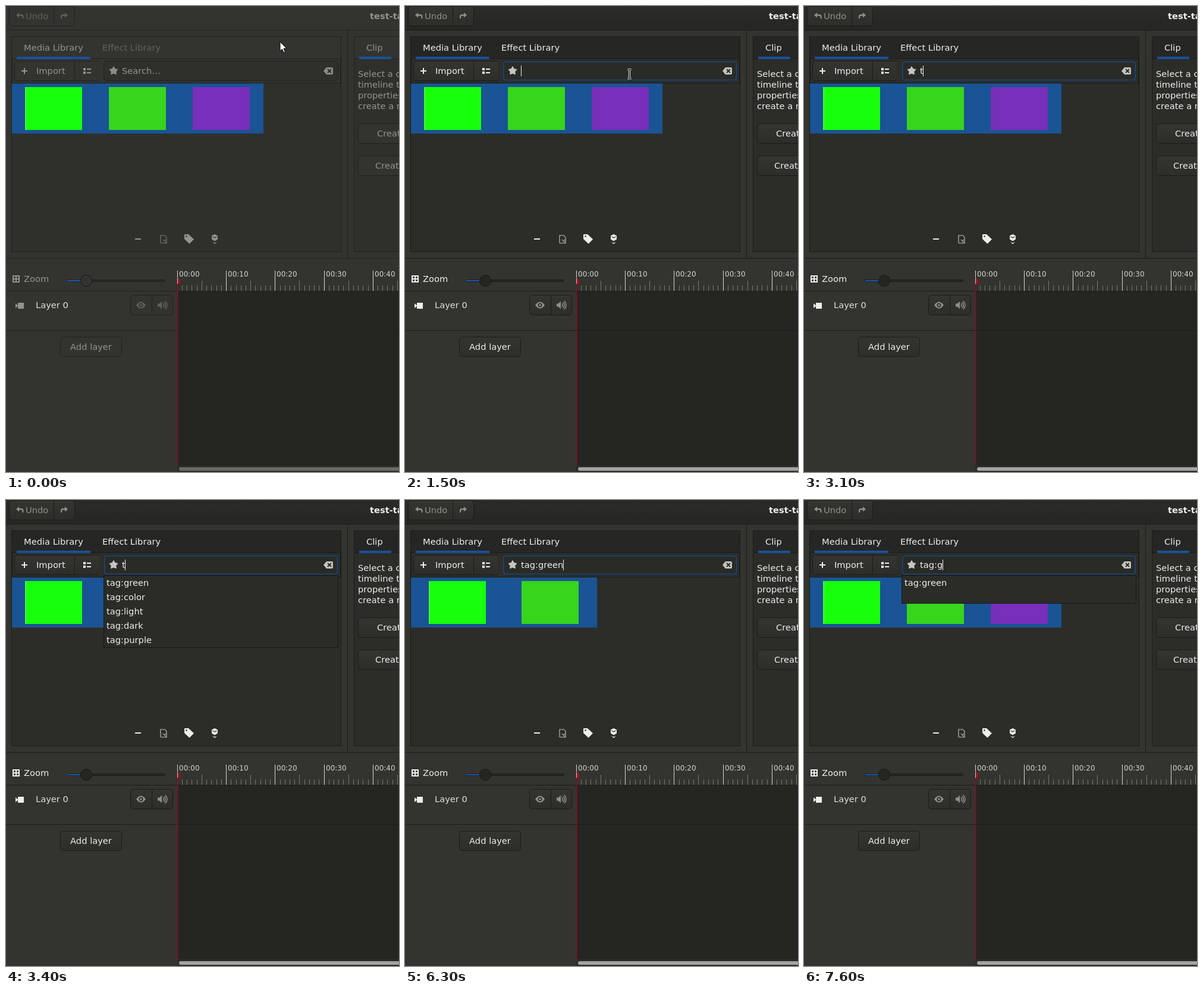
Write an HTML page that moves like this. It is 661 px wide and 782 px high and loops after 8 s.

```html
<!DOCTYPE html>
<html lang="en">
<head>
<meta charset="utf-8">
<title>Media library tag search</title>
<style>
  html, body { margin: 0; width: 100%; height: 100%; overflow: hidden; background: #333430; }
  svg {
    display: block; width: 100vw; height: 100vh;
    font-family: "DejaVu Sans", sans-serif; font-size: 14.667px; white-space: pre;
    --fg: #eeeeec; --dim: #8f908c; --tab: #eeeeec; --edge: #1b1c19;
    --bg: #333430; --panel: #2c2d29; --head: #262724; --headTop: #2b2c29;
    --btn: url(#btn); --flat: #2d2e2a; --bar: #a3a4a1; --knob: #252622; --star: #c4c4c1;
  }
  svg.off {
    --fg: #93948f; --dim: #60615d; --tab: #62635e; --edge: #21221f;
    --panel: #2f302c; --head: #333430; --headTop: #333430;
    --btn: #333430; --flat: #333430; --bar: #696a66; --knob: #333430; --star: #8b8c88;
  }
  text { fill: var(--fg); }
  .fg { fill: var(--fg); }
  .dim { fill: var(--dim); }
  .edge { fill: none; stroke: var(--edge); }
  .btn { fill: var(--btn); stroke: var(--edge); }
  .small { font-size: 12px; fill: #d0d0cd; }
</style>
</head>
<body>
<svg id="stage" viewBox="0 0 661 782" preserveAspectRatio="none">
  <defs>
    <linearGradient id="btn" x1="0" y1="0" x2="0" y2="1">
      <stop offset="0" stop-color="#343531"/><stop offset="1" stop-color="#2d2e2a"/>
    </linearGradient>
    <linearGradient id="top" x1="0" y1="0" x2="0" y2="1">
      <stop offset="0" style="stop-color:var(--headTop)"/><stop offset="1" style="stop-color:var(--head)"/>
    </linearGradient>
  </defs>
</svg>
<script>
const LOOP = 8000, BLUE = '#1a5494', DARK = '#252622';
const TAGS = ['green', 'color', 'light', 'dark', 'purple'];
const COLORS = ['#17ff0b', '#37d51c', '#782fb9'];
const stage = document.getElementById('stage');

const rect = (x, y, w, h, fill, extra = '') =>
  `<rect x="${x}" y="${y}" width="${w}" height="${h}" style="fill:${fill}" ${extra}/>`;
const path = (d, cls, extra = '') => `<path d="${d}" class="${cls}" ${extra}/>`;
const text = (x, y, s, extra = '') => `<text x="${x}" y="${y}" ${extra}>${s}</text>`;
const box = (x, y, w, h, r = 5) =>
  `<rect x="${x + .5}" y="${y + .5}" width="${w}" height="${h}" rx="${r}" class="btn"/>`;
const stroke = (d, color, w = 1) =>
  `<path d="${d}" style="fill:none;stroke:${color};stroke-width:${w}"/>`;

function star(cx, cy, r) {
  const pts = Array.from({ length: 10 }, (_, i) => {
    const a = i * Math.PI / 5 - Math.PI / 2, k = i % 2 ? r * .56 : r;
    return `${(cx + k * Math.cos(a)).toFixed(1)},${(cy + k * Math.sin(a)).toFixed(1)}`;
  });
  return `<polygon points="${pts.join(' ')}" style="fill:var(--star);stroke:var(--star);stroke-linejoin:round"/>`;
}

function header() {
  return rect(0, 0, 661, 40, 'url(#top)') + path('M0 40.5H661', 'edge') +
    box(5, 0, 110, 33) + path('M80.5 1V33', 'edge') +
    path('M17 15.5l5-4.5v3h3.5q4 0 4 4v3h-2v-2.500q0-2-2-2H22v3z', 'dim') +
    path('M104 15.500l-5-4.500v3h-3q-4 0-4 4v3h2v-2.500q0-2 2-2H99v3z', 'dim') +
    text(33, 22, 'Undo', 'class="dim"') +
    text(612, 22, 'test-tags', 'font-weight="bold"');
}

function panels() {
  const side = ['Select a clip on the', 'timeline to configure its', 'properties and effects or', 'create a new clip:'];
  return path('M0 423.5H661M574.5 41V423', 'edge') +
    rect(9.5, 51.5, 554, 361, 'var(--panel)', 'class="edge"') +
    rect(10, 52, 553, 37, 'var(--head)') + rect(10, 89, 553, 40, 'var(--flat)') +
    path('M10 88.5H563M10.5 89V129.500H562.500V89', 'edge') +
    rect(18, 85, 124, 4, '#1b509c') +
    text(30, 75, 'Media Library') + text(162, 75, 'Effect Library', 'style="fill:var(--tab)"') +
    rect(585.5, 51.5, 90, 361, 'var(--panel)', 'class="edge"') +
    rect(586, 52, 80, 37, 'var(--head)') + path('M586 88.5H661', 'edge') +
    rect(594, 85, 54, 4, '#1b509c') + text(606, 75, 'Clip') +
    side.map((s, i) => text(592, 119 + 18 * i, s)).join('') +
    box(592, 197, 150, 33) + text(624, 219, 'Create title clip') +
    box(592, 251, 150, 33) + text(621, 273, 'Create color clip');
}

function libraryTools() {
  const list = [104, 110].map(y =>
    rect(130, y, 4, 4, 'var(--fg)') + rect(136, y + 1, 7, 2, 'var(--fg)')).join('');
  return path('M157 92.500H19.500q-5 0-5 5V120.500q0 5 5 5H157', 'btn') +
    rect(156, 91, 2, 36, 'var(--flat)') + path('M115.5 93V125', 'edge') +
    stroke('M26 109H36M31 104V114', 'var(--fg)', 2) + text(51, 114, 'Import') + list +
    rect(217, 390, 10, 2, 'var(--fg)') +
    stroke('M260 398V385H267L270 388V398H260M264 392l5 5m0-5l-3 3', 'var(--dim)', 1.7) +
    path('M300 384q0-1 1-1h6l9 8.500-7.500 7.500-8.500-8z', 'fg') +
    `<circle cx="303.500" cy="386.500" r="1.300" style="fill:var(--panel)"/>` +
    path('M351 383l5 2.500v6l-5 3-5-3v-6z', 'fg') +
    stroke('M347.500 387L351 389L354.500 387', 'var(--panel)', 1.2) +
    path('M347 396l4 1.500 4-1.500-4 3.500z', 'fg');
}

function ruler() {
  let out = '';
  for (let i = 0; i < 46; i++) {
    const x = Math.floor(288.3 + i * 8.225), major = i % 10 === 0;
    const y = major ? 444 : i % 5 ? 469 : 461;
    out += rect(x, y, 1, 478 - y, major ? '#d6d6d3' : '#777874');
    if (major) out += text(x + 3, 454, `00:${i}`.replace(/:0$/, ':00'), 'class="small"');
  }
  return out;
}

function timeline() {
  return stroke('M12 453H22V463H12ZM17 453V463M12 458H22', 'var(--fg)', 2) +
    text(30, 463, 'Zoom') +
    rect(102.5, 459.5, 165, 3, '#272824', 'class="edge" rx="1.5"') +
    rect(103, 460, 32, 2, '#1b5bb0') +
    `<circle cx="135" cy="461" r="9.500" style="fill:var(--knob);stroke:#171815"/>` +
    ruler() +
    rect(289, 478, 372, 293, DARK) + rect(288, 771, 373, 11, '#2c2d29') +
    path('M0 478.5H661M0 544.5H661', 'edge') +
    path('M20 498H30V508H20ZM16 499L20 502.500V503.500L16 507Z', 'fg') +
    text(50, 507, 'Layer 0', 'style="fill:#dededb"') +
    box(209, 485, 71, 33) + path('M245.5 486V518', 'edge') +
    path('M219 502q8-11 16 0q-8 11-16 0z', 'dim') +
    `<circle cx="227" cy="502" r="3.500" style="fill:var(--flat)"/><circle cx="227" cy="502" r="1.800" class="dim"/>` +
    path('M255 499.500h3l4-4V508.500l-4-4h-3z', 'dim') +
    stroke('M264 499q2.500 3 0 6M266 497q4.500 5 0 10M268 495q6 7 0 14', 'var(--dim)', 1.5) +
    box(91, 555, 103, 33) + text(143, 577, 'Add layer', 'text-anchor="middle"') +
    rect(288, 458, 1.4, 313, '#930b1c') +
    path('M288 456L293 459V465L288 468Z', '', 'fill="#a50d20"') +
    rect(288, 457, 1, 9, '#d6c6c4') +
    rect(291, 774, 380, 6, 'var(--bar)', 'rx="3"');
}

stage.innerHTML += rect(0, 0, 661, 782, 'var(--bg)') + header() + panels() + libraryTools() +
  timeline() + '<g id="thumbs"></g><g id="entry"></g><g id="popup"></g><g id="pointer"></g>' +
  '<text id="probe" visibility="hidden"></text>';

const layer = id => document.getElementById(id);
const probe = layer('probe');
const put = (id, html) => {
  const el = layer(id);
  if (el.source !== html) el.innerHTML = el.source = html;
};
const widthOf = s => {
  if (!s) return 0;
  probe.textContent = s;
  return probe.getComputedTextLength();
};

function thumbs(count) {
  const cell = count === 3 ? 141 : 156.5;
  let out = rect(10, 130, cell * count, 84, BLUE);
  for (let i = 0; i < count; i++) {
    const x = Math.floor(10 + cell * i + (cell - 96) / 2);
    out += rect(x, 136, 96, 72, COLORS[i]);
    if (!i) out += rect(x, 136, 2, 72, '#4cf53f');
  }
  return out;
}

function entry(value, active, selecting, caret) {
  let out = rect(164.5, 92.5, 394, 33, active ? '#2a2b27' : '#2f302c', 'rx="5" class="edge"');
  if (active) out += `<rect x="165.500" y="93.500" width="392" height="31" rx="4" style="fill:none;stroke:#1c4b88;stroke-width:1.700"/>`;
  out += star(181, 108.8, 7.3) +
    path('M534 109l5-6h9q2 0 2 2v8q0 2-2 2h-9z', '', 'style="fill:var(--star)"') +
    stroke('M541 106l6 6m0-6l-6 6', '#2b2c28', 2);
  const end = Math.floor(195 + widthOf(value));
  if (selecting) out += rect(201, 100, end - 201, 18, BLUE);
  out += active ? text(195, 114, value) : text(195, 114, 'Search…');
  if (caret) out += rect(end, 100, 1, 18, '#eeeeec');
  return out;
}

function popup(tags, height, selected) {
  return rect(164.5, 126.5, 394, height, '#2b2c28', 'stroke="#181916"') +
    (selected ? rect(165, 127, 393, 24, BLUE) : '') +
    tags.map((tag, i) => text(169, 144 + 24 * i, `tag:${tag}`)).join('');
}

function pointer(x, y) {
  const overEntry = x > 164 && x < 559 && y > 92 && y < 126;
  const d = overEntry
    ? 'M-3 -7.500H-1L.5 -6.500L2 -7.500H4M.5 -6.500V6.500M-3 7.500H-1L.5 6.500L2 7.500H4'
    : 'M0 0V15.500L3.500 12.300L6 18L8.500 17L6 11.300H10.800Z';
  const style = overEntry
    ? ['fill:none;stroke:#fff;stroke-width:3.200', 'fill:none;stroke:#000;stroke-width:1.300']
    : ['fill:#fff;stroke:#000;stroke-width:1'];
  return `<g transform="translate(${x} ${y})">` +
    style.map(s => `<path d="${d}" style="${s}"/>`).join('') + '</g>';
}

// The pointer is sampled ten times a second.
const APPROACH = [[461, 60], [459, 56], [451, 54], [432, 65], [405, 92], [384, 121], [377, 114]];
function pointerAt(t) {
  if (t < 1500) return APPROACH[Math.max(0, Math.min(6, Math.floor(t / 100) - 7))];
  const k = Math.min(1, Math.floor((t - 1500) / 100) / 5), e = k * k * (3 - 2 * k);
  return [377 + 247 * e, 114 + 156 * e];
}

function valueAt(t) {
  if (t < 3100) return '';
  if (t < 4500) return 't';
  const erased = [7200, 7300, 7400, 7600].filter(at => t >= at).length;
  return 'tag:green'.slice(0, 9 - erased);
}

function draw(t) {
  const within = (a, b) => t >= a && t < b;
  const active = t >= 1500, selecting = within(4500, 6300);
  const caret = active && !selecting && !within(2300, 2700) && !within(4200, 4500);
  stage.classList.toggle('off', !active);
  put('thumbs', thumbs(within(4500, 7200) ? 2 : 3));
  put('entry', entry(valueAt(t), active, selecting, caret));
  put('popup', within(3400, 6300) ? popup(TAGS, 121, selecting)
    : t >= 7300 ? popup(TAGS.slice(0, 1), 47, false) : '');
  put('pointer', t < 2200 ? pointer(...pointerAt(t)) : '');
}

const start = performance.now();
function tick() {
  draw((performance.now() - start) % LOOP);
  requestAnimationFrame(tick);
}
tick();
</script>
</body>
</html>
```
